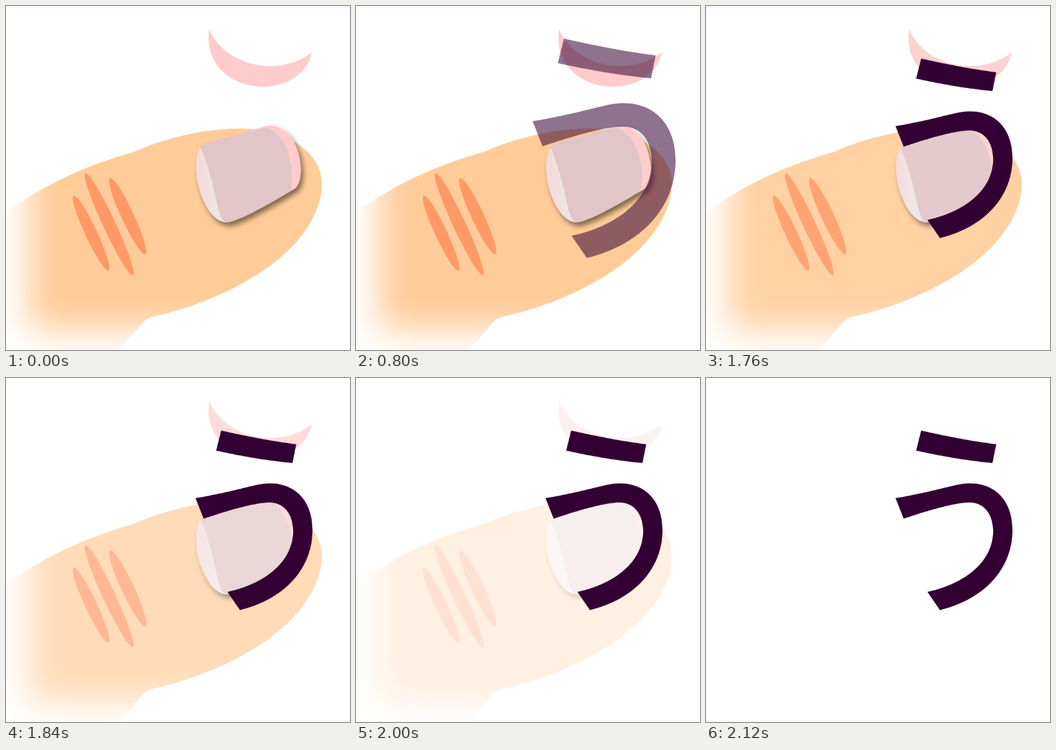
Recreate the animation shown at these times as an HTML page. Size 550 px wide and 550 px high, loop 2.96 s.

```html
<!DOCTYPE html>
<html lang="ja">
<head>
<meta charset="utf-8">
<title>う</title>
<style>
  html, body { margin: 0; width: 100%; height: 100%; overflow: hidden; background: #fff; }
  svg { display: block; width: 100%; height: 100%; }

  .thumb { animation: fade 2960ms infinite; }
  .letter {
    fill: #303;
    transform-origin: 396px 227.5px;
    animation: land 2960ms infinite;
  }

  /* Both movements advance once every 40 ms. */
  @keyframes land {
    0% { opacity: 0; transform: scale(1.444); animation-timing-function: step-end; }
    21.621% { opacity: .111; transform: scale(1.444); animation-timing-function: steps(8, end); }
    32.432%, 100% { opacity: 1; transform: scale(1); }
  }
  @keyframes fade {
    0% { opacity: 1; animation-timing-function: step-end; }
    59.459% { opacity: .9; animation-timing-function: steps(9, end); }
    71.621%, 100% { opacity: 0; }
  }
</style>
</head>
<body>
<svg viewBox="0 0 550 550">
  <defs>
    <filter id="soften" filterUnits="userSpaceOnUse" x="-100" y="-200" width="1000" height="900">
      <feGaussianBlur stdDeviation="27"/>
    </filter>
    <filter id="shadow" x="-20%" y="-20%" width="140%" height="140%">
      <feDropShadow dx="4" dy="6" stdDeviation="4" flood-color="#000" flood-opacity=".5"/>
    </filter>
    <mask id="wrist" maskUnits="userSpaceOnUse" x="0" y="0" width="550" height="550" color-interpolation="sRGB">
      <rect x="36" y="-90" width="700" height="608" fill="#fff" filter="url(#soften)"/>
    </mask>
    <linearGradient id="moon">
      <stop offset="0" stop-color="#f6d8d8"/>
      <stop offset=".6" stop-color="#ece6e6"/>
      <stop offset="1" stop-color="#e4dada"/>
    </linearGradient>
  </defs>

  <g class="thumb">
    <path fill="#fcc" d="M325 37C338 72 380 96 421 96C448 96 472 88 489 74C482 108 450 129 411 129C357 129 316 90 325 37Z"/>
    <path fill="#fc9" mask="url(#wrist)" d="M0 331C50 292 120 257 205 233C260 209 320 196 372 196C448 196 505 233 505 285C505 327 476 376 420 417C355 463 282 487 230 498Q223 501 218 507L181 550H0Z"/>
    <g fill="#f96">
      <ellipse rx="66" ry="9.5" transform="translate(136 363) rotate(65)"/>
      <ellipse rx="90" ry="10" transform="translate(165 349) rotate(65)"/>
      <ellipse rx="67" ry="10" transform="translate(194.5 336) rotate(65)"/>
    </g>
    <g filter="url(#shadow)">
      <path fill="#fcc" d="M390 199L415 192C436 187 454 202 463 223C473 246 474 274 466 287C463 292 459 294 452 297L400 310Z"/>
      <path fill="url(#moon)" d="M311 226C301 243 302 275 312 302C321 326 334 344 352 346L362 300Z"/>
      <path fill="#e2c5c8" d="M311 226C314 222 324 217 340 213L412 195C421 194 430 200 438 210C457 235 460 268 455 296C425 314 400 328 378 338C366 343 358 346 351 346C344 341 342 333 339 323C332 290 324 255 311 226Z"/>
    </g>
  </g>

  <g class="letter">
    <path d="M344 84C384 93 424 101 464 106L458 136C418 132 376 125 336 116Z"/>
    <path d="M303 192C340 186 370 178 400 171C455 159 490 191 490 243C490 305 445 354 374 371L354 342C418 328 459 291 459 245C459 217 444 199 421 199C398 199 351 213 316 225Z"/>
  </g>
</svg>
</body>
</html>
```
